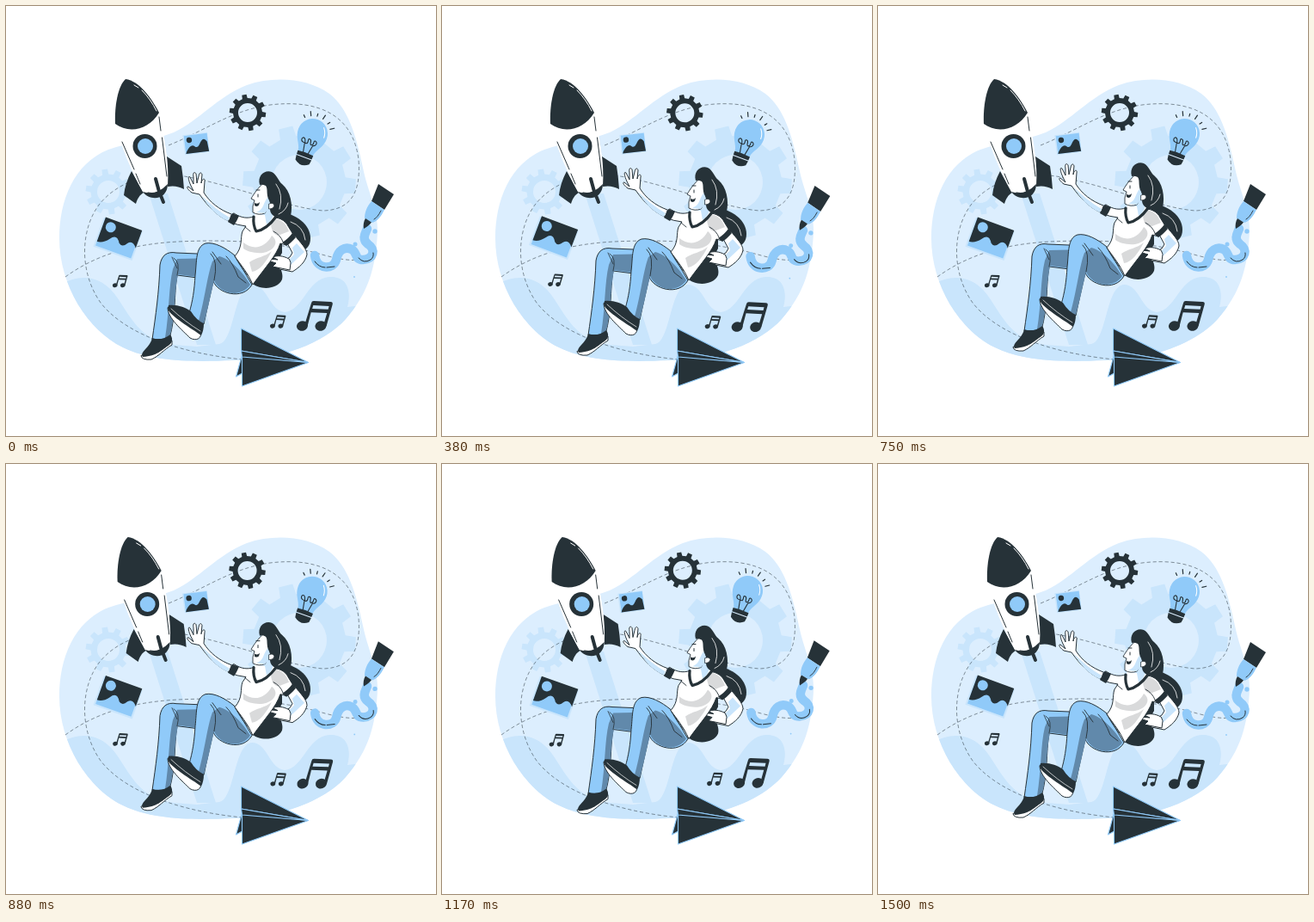
These frames come from a looping animation (500x500 px, 1540 ms). An HTML page:

```html
<!DOCTYPE html>
<html lang="en">
<head>
<meta charset="utf-8">
<title>Creative flight</title>
<style>
html, body { margin: 0; width: 100%; height: 100%; overflow: hidden; background: #fff; }
svg { display: block; width: 100vw; height: 100vh; }
.dark { fill: #263238; }
.blue { fill: #90caf9; }
.pale { fill: #c9e5fc; }
.shade { fill: #6189ab; }
.grey { fill: #d9dadb; }
.line { fill: none; stroke: #263238; stroke-linecap: round; stroke-linejoin: round; }
.light { stroke: #fff; }
.skin { fill: #fff; stroke: #263238; stroke-linecap: round; stroke-linejoin: round; }
.dash { fill: none; stroke: #263238; stroke-opacity: .58; stroke-width: .9; stroke-dasharray: 4.2 2.8; }
</style>
</head>
<body>
<svg viewBox="0 0 500 500" xmlns="http://www.w3.org/2000/svg">
<defs>
  <path id="blobShape" d="M62 270C62 226 79 183 119 167C143 158 171 157 195 147C225 133 245 106 280 92C312 81 351 84 376 102C398 119 407 150 415 188C420 214 433 238 432 263C430 303 422 333 395 364C370 392 318 412 262 412C220 414 170 414 136 397C95 377 62 325 62 270Z"/>
  <clipPath id="blobClip"><use href="#blobShape"/></clipPath>
  <g id="note" class="dark">
    <ellipse cx="-15" cy="11.5" rx="6.6" ry="5.7" transform="rotate(-18 -15 11.5)"/>
    <ellipse cx="6.5" cy="11.5" rx="6.6" ry="5.7" transform="rotate(-18 6.5 11.5)"/>
    <path d="M-12.500 11L-4.500-15Q-4-17.500-1.500-17.400L18-16.500Q20.800-16.300 20.200-13.500L13 12L9.500 11L13.800-3.500L-4.800-4.300L-9 12ZM-3.400-8.500L15.100-7.700L16.100-11.600L-2.200-12.400Z"/>
  </g>
</defs>

<use href="#blobShape" fill="#dceefe"/>
<g class="pale" clip-path="url(#blobClip)">
  <path d="M60 326C85 310 112 312 130 340C146 364 158 390 196 394L222 396L248 393C266 390 265 325 286 324C304 324 306 354 324 356C346 354 350 317 376 315C397 314 402 331 397 350L440 345V430H60Z"/>
  <path d="M166 218L188 218L244 394L222 394Z"/>
</g>
<path id="bigGear" class="pale" fill-rule="evenodd"/>
<path id="leftGear" class="pale" fill-rule="evenodd"/>
<path class="dash" d="M69 315C102 291 143 277 200 274C285 270 332 279 371 290C397 297 416 298 428 289"/>
<path class="dash" d="M189 162C231 145 263 121 307 115C365 108 404 128 410 179C413 218 400 237 369 238C330 235 278 213 218 200C173 190 132 202 109 230C87 258 84 308 110 345C141 385 212 405 275 411"/>

<g id="icons">
  <path id="darkGear" class="dark" fill-rule="evenodd"/>

  <g transform="translate(356.500 148.500) rotate(20)">
    <path class="blue" d="M-17.500 0A17.500 17.500 0 1 1 17.500 0C17.500 11 10.500 15 9 24H-9C-10.500 15-17.500 11-17.500 0Z"/>
    <path class="line" stroke-width="1.100" d="M-3 24L-5 13C-12 13-10 6-7 8C-4 10-6 14-3 13C0 12-4 7-1 7C3 7 0 13 3 13C7 12 3 7 6 7C10 8 8 13 5 13L3 24"/>
    <path class="line light" stroke-width="1" d="M10-11Q14-6 14 0"/>
    <path class="dark" d="M-9.500 24Q0 22.500 9.500 24L9.300 28.500H-9.300ZM-9.300 29.500H9.300L8.500 35Q0 42-8.500 35Z"/>
    <g id="rays" class="line" stroke-width="1.200"></g>
  </g>

  <g>
    <path d="M359 290C361 307 381 307 384 295C386 284 394 279 402 283C409 287 405 295 415 295C428 294 430 283 421 277C413 271 418 264 420 259" fill="none" stroke="#90caf9" stroke-width="10.500" stroke-linecap="round"/>
    <path class="line" stroke-width="1" d="M359 297Q364 304 371 304M373 304L382 303M410 293Q416 300 424 295Q428 292 427 287"/>
    <circle class="blue" cx="406" cy="277" r="2.500"/>
    <circle class="blue" cx="429" cy="262" r="2.700"/>
    <circle class="blue" cx="405" cy="315" r=".9"/>
    <path class="dark" d="M433 207L451 219L440 237L425 227Z"/>
    <path class="blue" d="M425 227L440 237C436 245 432 250 426 252L417 247C417 239 420 233 425 227Z"/>
    <path class="dark" d="M418 247L425 251.500C423 255 419 257 416 259C415 255 416 250 418 247Z"/>
    <path class="line" stroke-width=".9" d="M436 238Q432 246 428 248"/>
  </g>

  <g transform="translate(130.500 270) rotate(20)">
    <rect class="pale" x="-24" y="-17" width="48" height="36"/>
    <rect class="blue" x="-22" y="-17" width="44" height="34"/>
    <path class="dark" d="M-22-18H23V4Q17-4 12 2Q8 9 3 5Q-3-5-9 4Q-15 12-22 12Z"/>
    <circle class="blue" cx="-12.500" cy="-9" r="6"/>
  </g>
  <g transform="translate(221 160) rotate(-7)">
    <rect class="pale" x="-14.500" y="-11.500" width="29" height="23"/>
    <rect class="blue" x="-13" y="-10.500" width="27" height="21"/>
    <path class="dark" d="M-13 10.500L-12 8Q-6-1-2 3Q1 6 4 1Q9-8 13-1L14 10.500Z"/>
    <circle class="dark" cx="-7.500" cy="-5" r="3.200"/>
  </g>

  <use href="#note" transform="translate(359.500 360.500)"/>
  <use href="#note" transform="translate(316.500 367) scale(.44)"/>
  <use href="#note" transform="translate(133 320) scale(.42)"/>
</g>

<g id="rocket">
  <path class="dark" d="M146 192C141 201 138 211 137 220L151 230C153 224 155 220 160 217Z"/>
  <path class="dark" d="M187 175L204 186Q206 198 207 213Q198 208 188 210Z"/>
  <path d="M127 136C134 164 145 191 159 216C167 225 183 224 188 209C190 183 184 152 178 124Z" fill="#fff"/>
  <path class="dark" d="M159 216Q175 221 188 207C188 225 168 228 159 216Z"/>
  <path class="dark" d="M139 85C130 93 126 117 127 137C143 149 166 144 178 124C169 107 155 87 139 85Z"/>
  <path class="line" stroke-width="1" d="M135 158L149 190M151 195L156 207M178 129L180 145M181.500 153L187 198M165 217Q175 219 182 215"/>
  <path class="line light" stroke-width="1" d="M149 92L154 95M158 98Q168 108 175 122"/>
  <circle class="dark" cx="161.500" cy="163" r="14"/>
  <circle class="blue" cx="162" cy="163" r="9"/>
  <path class="line" stroke-width="4" d="M174 201Q177 215 183 228"/>
</g>

<g id="woman">
  <path class="dark" d="M321 270C307 289 287 310 286 322C293 330 315 331 321 318C324 309 313 299 321 287Z"/>
  <path class="dark" d="M318 240C337 241 354 254 354 270C354 282 345 289 333 280L318 258Z"/>
  <path class="line light" stroke-width=".8" d="M331 251Q346 256 348 272"/>

  <path class="skin" d="M336 267C342 275 350 282 350 289C348 298 341 304 333 309L318 306L315 301L330 292L333 287L326 274Z"/>
  <path class="pale" d="M333 281L338 276L347 286L331 301L325 299L335 289Z"/>
  <path class="skin" d="M329 294C322 290 315 290 310 292L316 295L306 294L304 296L314 299L310 303L320 305L330 307L331 299Z"/>

  <path class="blue" stroke="#263238" d="M246 289L198 287C187 285 181 290 179 301C178 333 174 360 170 388L190 387C198 358 195 337 199 313L246 319Z"/>
  <path class="shade" d="M199 294L245 293L245 318L200 312C195 336 197 361 190 386L185 386C190 356 189 326 194 306Z"/>
  <path class="line" stroke-width=".8" d="M195 293Q203 298 199 313M193 292L199 305"/>
  <path class="skin" d="M157 407Q158 412 169 411C178 407 183 400 193 394L193 389L165 403Z"/>
  <path class="dark" d="M170 386Q181 390 191 382C194 386 194 391 190 394C181 400 176 407 159 408C155 402 167 398 170 386Z"/>

  <path class="blue" stroke="#263238" d="M266 290C255 281 242 274 232 276C220 280 222 297 220 313C219 331 217 343 213 357Q220 367 230 370C233 355 237 338 241 320C246 334 275 343 286 324Z"/>
  <path class="shade" d="M248 291C261 294 276 310 284 324C272 341 248 334 242 319C238 336 234 355 230 369L224 366C231 342 234 313 240 297Z"/>
  <path class="line" stroke-width=".9" d="M238 288Q247 296 242 319M240 286L250 300M266 291Q276 309 284 316M256 291Q264 299 270 315L279 322"/>
  <path class="skin" d="M188 351C188 363 205 377 214 386C221 390 229 387 226 377L194 350Z"/>
  <path class="dark" d="M189 348C199 347 208 350 215 355Q221 365 230 369Q230 377 227 383C216 375 190 360 188 352Z"/>
  <path class="line light" stroke-width=".7" d="M192 352Q208 367 226 378"/>

  <path class="skin" d="M262 242C248 237 237 228 230 217L231 204C232 200 228 200 227 206L228 196C227 193 225 193 224 198L222 206L221 195C219 192 217 194 218 199L218 207L214 199C212 197 211 200 215 209L218 215L212 210C209 210 212 214 216 217L225 219C235 233 245 244 259 250Z"/>
  <path class="pale" d="M258 250C244 244 235 233 227 220C237 230 248 239 260 246Z"/>

  <path class="skin" d="M265 241C274 247 281 247 288 245L308 246C316 245 325 249 328 256L336 269L326 278L319 276C314 291 302 303 287 324C281 310 273 301 266 291C276 280 272 270 275 262L279 256Q269 255 260 251Z"/>
  <path class="grey" d="M308 247C319 246 326 253 329 262L316 267Q307 264 308 247ZM276 275C287 284 301 282 309 267C318 274 312 283 303 286C294 289 281 286 276 282ZM283 298C291 292 301 292 309 285C303 297 295 308 286 309Z"/>
  <path class="dark" d="M263 241L271 244Q268 251 265 255L258 251Q261 247 263 241Z"/>
  <path class="dark" d="M333 264L337 269Q331 276 326 279L321 275Q328 271 333 264Z"/>
  <path class="line" stroke-width=".9" d="M311 262Q319 266 322 274M278 257L284 262"/>

  <path d="M289 238L290 261Q302 260 313 244L312 228Z" fill="#fff"/>
  <path class="pale" d="M302 220C296 229 300 235 291 242L301 243L303 254Q311 249 312 237L309 222Z"/>
  <path class="line" stroke-width="3.200" d="M288 245Q287 255 291 262Q303 260 314 245"/>
  <path class="skin" stroke-width=".9" d="M301 241Q294 244 287 240L287 233L289 226L285 224C289 217 293 212 300 205L308 212L306 228Z"/>
  <path class="pale" d="M305 222C298 229 301 236 291 240L301 241L308 232Z"/>
  <path class="dark" d="M289 229Q293 231 295 228Q294 235 289 232Z"/>
  <path class="line" stroke-width="1" d="M293 219V222M291 214L295 214"/>
  <path class="dark" d="M295 208C292 197 301 190 309 193C315 196 317 204 321 207C331 215 334 232 331 244C324 249 314 248 309 242C305 237 309 232 306 226C302 219 305 213 302 209Q298 207 295 208Z"/>
  <path class="skin" stroke-width=".8" d="M306 230Q311 228 312 232Q311 236 306 236Z"/>
  <path class="line light" stroke-width=".8" d="M314 207Q323 219 318 236M317 242Q326 238 328 229"/>
</g>

<g class="dark" stroke="#90caf9" stroke-width="1.100" stroke-linejoin="round" transform="translate(-.5 0)">
  <path d="M276 402L268 431L286 421Z"/>
  <path d="M274 375L352 414.500L274 401Z"/>
  <path d="M275 407L352 414.500L275 442Z"/>
  <path d="M274 401L352 414.500L275 408Z"/>
</g>
</svg>
<script>
const $ = id => document.getElementById(id);

function gear(id, cx, cy, r, root, hole, teeth, turn) {
  const at = (rad, a) => `${(cx + rad * Math.cos(a)).toFixed(2)} ${(cy + rad * Math.sin(a)).toFixed(2)}`;
  const pitch = Math.PI * 2 / teeth, points = [];
  for (let i = 0; i < teeth; i++) {
    const a = i * pitch + turn;
    points.push(at(root, a - pitch * .28), at(r, a - pitch * .2),
                at(r, a + pitch * .2), at(root, a + pitch * .28));
  }
  const ring = `M${cx - hole} ${cy}a${hole} ${hole} 0 1 0 ${hole * 2} 0a${hole} ${hole} 0 1 0 ${-hole * 2} 0Z`;
  $(id).setAttribute('d', `M${points.join('L')}Z${ring}`);
}
gear('bigGear', 341, 205, 66, 54, 32, 10, .07);
gear('leftGear', 119, 216, 26.500, 20.500, 13, 10, .15);
gear('darkGear', 281, 124, 21.300, 17, 11, 10, .12);

$('rays').innerHTML = [-135, -115, -95, -75, -53, -34].map((a, i) =>
  `<path d="M21 0H${i % 2 ? 26 : 24}" transform="rotate(${a})"/>`).join('');

// Each track is a list of [progress, value], linear between stops.
const shake = [[0, 0], [.1, -1], [.2, 2], [.3, -4], [.4, 4], [.5, -4], [.6, 4], [.7, -4], [.8, 2], [.9, -1], [1, 0]];
const float = [[0, 0], [.5, -10], [1, 0]];
const sway = [[0, 0], [.25, .6], [.75, -.6], [1, 0]];

function valueAt(track, p) {
  const i = track.findIndex(stop => stop[0] > p);
  const [p0, v0] = track[i - 1], [p1, v1] = track[i];
  return v0 + (v1 - v0) * (p - p0) / (p1 - p0);
}

const LOOP = 1540, STEPS = 37, CYCLE = 36;
const start = performance.now();

function draw(now) {
  const t = Math.max(0, now - start) % LOOP;
  const step = Math.floor(t / LOOP * STEPS + .1);
  const p = step % CYCLE / CYCLE;
  $('rocket').setAttribute('transform', `translate(${valueAt(shake, p)} 0)`);
  $('woman').setAttribute('transform', `translate(0 ${valueAt(float, p)})`);
  $('icons').setAttribute('transform', `rotate(${valueAt(sway, p)} 250 250)`);
  requestAnimationFrame(draw);
}
draw(start);
</script>
</body>
</html>
```
